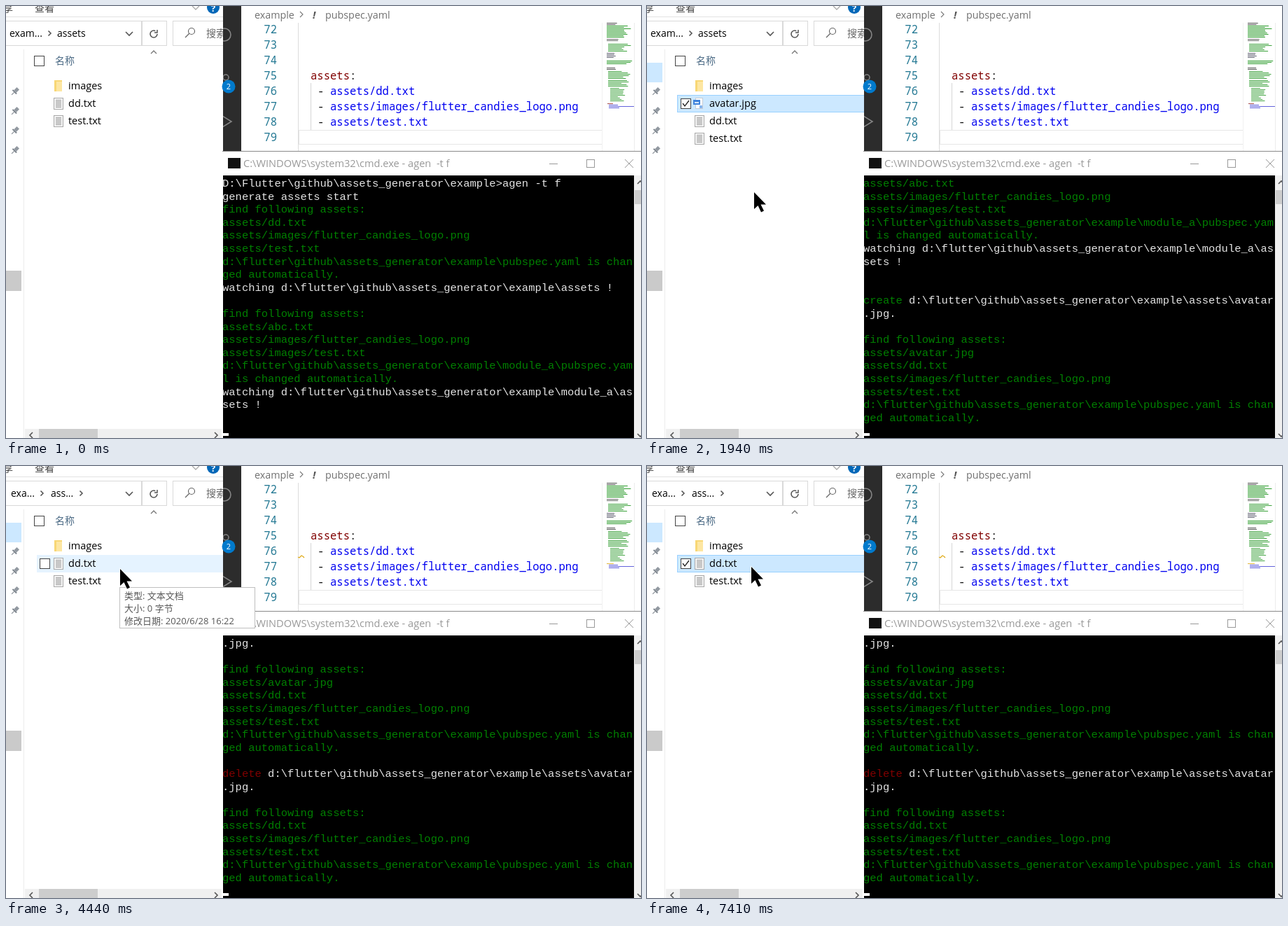
Animation, 907 px wide and 617 px high, one loop 8 s. Source, as an HTML page with a canvas:

```html
<!DOCTYPE html>
<html lang="zh">
<head>
<meta charset="utf-8">
<style>
html, body { margin: 0; width: 100%; height: 100%; overflow: hidden; background: #fff; }
canvas { display: block; }
</style>
</head>
<body>
<canvas id="stage" width="907" height="617"></canvas>
<script>
const g = document.getElementById('stage').getContext('2d');
const LOOP = 8000;
const UI = '"Open Sans", "Noto Sans CJK SC", "Noto Sans CJK", sans-serif';
const CODE = '15.55px "Noto Sans Mono", "DejaVu Sans Mono", monospace';
const TERM = '15.5px "Liberation Mono", monospace';
const ui = size => `${size}px ${UI}`;

function rect(x, y, w, h, color) { g.fillStyle = color; g.fillRect(x, y, w, h); }
function frame(x, y, w, h, color) {
  g.strokeStyle = color; g.lineWidth = 1;
  g.strokeRect(x + .5, y + .5, w - 1, h - 1);
}
function text(s, x, y, color, font = ui(14.5), align = 'left') {
  g.font = font; g.fillStyle = color; g.textAlign = align;
  g.fillText(s, x, y);
}
function line(points, color, width = 1) {
  g.strokeStyle = color; g.lineWidth = width;
  g.beginPath();
  points.forEach(([x, y]) => g.lineTo(x, y));
  g.stroke();
}
function disc(x, y, r, color) {
  g.fillStyle = color; g.beginPath(); g.arc(x, y, r, 0, 7); g.fill();
}
function ring(x, y, r, color, width = 1, from = 0, to = 7) {
  g.strokeStyle = color; g.lineWidth = width;
  g.beginPath(); g.arc(x, y, r, from, to); g.stroke();
}
// Arrow head: (dx, dy) points from the corner to the wings' middle.
function chevron(x, y, dx, dy, color, width = 1.3) {
  line([[x - dx - dy, y - dy - dx], [x, y], [x - dx + dy, y - dy + dx]], color, width);
}
const within = (t, a, b) => t >= a && t < b;

// Pointer moves: start, end, number of steps, destination.
const moves = [
  [70, 290, 4, 90, 130],
  [1070, 1300, 4, 119, 253],
  [1376, 1450, 2, 153, 266],
  [2320, 2720, 6, 165, 180],
  [2950, 3430, 7, 163, 147],
  [4600, 4680, 2, 157, 139],
  [4840, 5060, 4, 157, 122],
  [5230, 5300, 2, 151, 146],
  [6010, 6090, 2, 153, 125],
  [6240, 6480, 4, 155, 118],
  [6860, 7090, 4, 153, 130],
  [7330, 7410, 2, 149, 144]
];
function pointer(t) {
  if (t < 70 || within(t, 360, 1070)) return null;
  let x = 917, y = 661;
  for (const [start, end, steps, tx, ty] of moves) {
    if (t < start) break;
    if (start === 1070) { x = -20; y = 233; }
    const k = Math.min(1, Math.floor((t - start) / (end - start) * (steps - 1) + 1.01) / steps);
    x += (tx - x) * k;
    y += (ty - y) * k;
  }
  return { x, y };
}

const GREEN = '#008000', WHITE = '#e4e4e4', RED = '#800000';
const ROOT = 'd:\\flutter\\github\\assets_generator\\example';
const LOGO = 'assets/images/flutter_candies_logo.png';
const green = (...lines) => lines.map(s => [s, GREEN]);
const white = (...lines) => lines.map(s => [s, WHITE]);
const found = files => green('find following assets:', ...files,
  ROOT + '\\pubspec.yaml is chan', 'ged automatically.');
const event = (word, color) => [
  [word, color, ' ' + ROOT + '\\assets\\avatar'], ...white('.jpg.', '')
];
const plain = ['assets/dd.txt', LOGO, 'assets/test.txt'];
const log = [
  ...white('D:\\Flutter\\github\\assets_generator\\example>agen -t f', 'generate assets start'),
  ...found(plain),
  ...white('watching ' + ROOT + '\\assets !', ''),
  ...green('find following assets:', 'assets/abc.txt', LOGO, 'assets/images/test.txt',
    ROOT + '\\module_a\\pubspec.yam', 'l is changed automatically.'),
  ...white('watching ' + ROOT + '\\module_a\\as', 'sets !', '', ''),
  ...event('create', GREEN),
  ...found(['assets/avatar.jpg', ...plain]),
  ...white(''),
  ...event('delete', RED),
  ...found(plain)
];

function checkbox(x, y, checked) {
  rect(x, y, 15, 15, '#fff');
  frame(x, y, 15, 15, '#444');
  if (checked) line([[x + 3, y + 7], [x + 6, y + 11], [x + 12, y + 3]], '#222', 1.3);
}

function fileIcon(name, y) {
  if (name === 'images') {
    rect(69, y - 8, 11, 16, '#f8d775');
    rect(72, y - 6, 8, 14, '#fde6a2');
  } else if (name === 'avatar.jpg') {
    rect(69, y - 8, 11, 16, '#fff');
    frame(69, y - 8, 11, 16, '#c5ccd6');
    rect(66, y - 5, 10, 7, '#3f83dc');
    rect(68, y - 2, 6, 2, '#d5e7fb');
    rect(75, y + 3, 4, 4, '#86b5ee');
  } else {
    rect(68, y - 8, 14, 17, '#f4f4f4');
    frame(68, y - 8, 14, 17, '#a8a8a8');
    for (let i = -5; i < 7; i += 2) rect(71, y + i, 8, 1, '#9c9c9c');
  }
}

function fileList(t, tip) {
  const files = ['images', 'dd.txt', 'test.txt'];
  if (within(t, 1690, 3970)) files.splice(1, 0, 'avatar.jpg');
  const selected = name => name === 'avatar.jpg' ||
    (name === 'dd.txt' && t >= 6010) ||
    (name === 'images' && within(t, 6240, 7330));
  const free = tip && t >= 1690 && !within(t, 6010, 6860);
  files.forEach((name, i) => {
    const top = 102 + 25 * i, mid = top + 12;
    const hover = free && tip.y >= top && tip.y < top + 25;
    if (selected(name)) {
      rect(43, top, 270, 25, '#cce8ff');
      frame(43, top, 270, 25, '#99d1ff');
    } else if (hover) rect(44, top, 266, 25, '#e5f3ff');
    if (selected(name) || hover) checkbox(48, mid - 7, selected(name));
    fileIcon(name, mid);
    text(name, 89, mid + 5, '#000');
  });
}

function pin(y) {
  g.save();
  g.translate(13, y);
  g.rotate(Math.PI / 4);
  rect(-2.5, -6, 5, 6, '#9299a1');
  rect(-4, 0, 8, 2, '#7e868e');
  rect(-.5, 2, 1, 5, '#7e868e');
  g.restore();
}

function explorer(t, tip) {
  rect(0, 0, 310, 617, '#fff');
  text('享', -4, 8, '#444', ui(14));
  text('查看', 41, 8, '#444', ui(14));
  if (within(t, 2090, 3970)) {
    rect(86, 0, 1, 9, '#ccc');
    rect(174, 0, 1, 9, '#ccc');
    text('图片工具', 102, 8, '#444', ui(14));
  }
  chevron(271, 5, 0, 5, '#aaa');
  disc(296, 2, 9, '#0067b8');
  text('?', 296, 8, '#fff', 'bold ' + ui(13), 'center');
  rect(0, 15, 310, 1, '#e2e2e2');
  frame(-2, 21, 197, 36, '#d9d9d9');
  frame(193, 21, 37, 36, '#d9d9d9');
  frame(238, 21, 80, 36, '#d9d9d9');
  const crumbs = t < 2160
    ? [['exam...', 5, 64], ['assets', 73]]
    : [['exa...', 7, 53], ['ass...', 64, 109]];
  for (const [name, x, arrowX] of crumbs) {
    text(name, x, 44, '#000', ui(14));
    if (arrowX) chevron(arrowX, 39, 3.5, 0, '#555', 1.6);
  }
  chevron(176, 42, 0, 5, '#555', 1.6);
  ring(211, 40, 5, '#555', 1.6, 0, 5.2);
  line([[216, 34], [216, 38], [212, 38]], '#555', 1.5);
  ring(265, 36, 4.5, '#666', 1.2);
  line([[262, 39], [256, 45]], '#666', 1.2);
  text('搜索', 286, 44, '#666', ui(14));

  rect(25, 62, 1, 555, '#ececec');
  if (t >= 360) rect(0, 81, 22, 28, '#cce8ff');
  [122, 150, 178, 206].forEach(pin);
  rect(0, 378, 22, 29, '#cacaca');
  checkbox(40, 71, false);
  text('名称', 70, 83, '#4b6a85', ui(14));
  chevron(211, 64, 0, -4, '#777');
  fileList(t, tip);
  rect(27, 604, 281, 13, '#f0f0f0');
  rect(47, 604, 84, 13, '#cdcdcd');
  chevron(34, 613, -4, 0, '#555', 1.6);
  chevron(302, 613, 4, 0, '#555', 1.6);
}

// Minimap blocks: top, bottom, indent, widest line, colour.
const blocks = [
  [24, 27, 1, 17, '#555'], [28, 45, 1, 39, '#2f9d2f'], [47, 51, 1, 18, '#666'],
  [54, 65, 3, 37, '#3fa33f'], [67, 75, 1, 15, '#667'], [78, 84, 1, 39, '#2f9d2f'],
  [88, 91, 1, 18, '#555'], [93, 104, 3, 37, '#3fa33f'], [106, 115, 3, 33, '#3fa33f'],
  [117, 137, 6, 28, '#4aa84a']
];
function minimap(added, warned) {
  blocks.forEach(([top, bottom, indent, width, color]) => {
    for (let y = top; y < bottom; y += 2) {
      const r = Math.abs(Math.sin(y * 12.99) * 437.58) % 1;
      rect(857 + indent, y, width * (.6 + .4 * r) - indent, 1, color);
    }
  });
  g.globalAlpha = .7;
  rect(859, 139, 8, 1, '#800000');
  [...(added ? [17] : []), 13, 36, 15].forEach((w, i) => rect(861, 141 + 2 * i, w, 1, '#22c'));
  g.globalAlpha = 1;
  if (added) rect(853, 140, 1, 3, '#81b88b');
  if (warned) rect(858, 139, 10, 1, '#e2b53c');
}

function editor(t) {
  const added = within(t, 2480, 4060), warned = t >= 4290;
  g.save();
  g.beginPath(); g.rect(310, 0, 597, 208); g.clip();
  rect(310, 0, 26, 208, '#2c2c2c');
  ring(312, 41, 9, '#858585', 1.6);
  ring(314, 102, 4, '#858585', 1.5);
  line([[309, 157], [322, 165], [309, 173]], '#858585', 1.6);

  rect(336, 0, 571, 208, '#fff');
  text('example', 355, 18, '#707070', ui(14.3));
  chevron(424, 12, 4, 0, '#777', 1.1);
  text('!', 438, 18, '#555', 'bold italic ' + ui(15));
  text('pubspec.yaml', 456, 18, '#707070', ui(14.3));
  const base = n => 38.5 + 22.1 * (n - 72);
  const lastLine = added ? 80 : 79;
  for (let n = 72; n <= lastLine; n++) text(n, 387, base(n), '#237893', CODE, 'right');
  rect(417, 24, 1, 184, '#dcdcdc');
  const files = [...(added ? ['assets/avatar.jpg'] : []), ...plain];
  const last = added ? 199 : 177;
  rect(435, 110, 1, last - 110, '#d6d6d6');
  frame(418, last, 434, 21, '#e6e6e6');
  text('assets', 435, base(75), '#800000', CODE);
  text(':', 491, base(75), '#111', CODE);
  files.forEach((name, i) => {
    text('-', 445, base(76 + i), '#111', CODE);
    text(name, 463, base(76 + i), '#0000f0', CODE);
  });
  if (within(t, 2480, 4290)) rect(392, 110, 4, 22, '#81b88b');
  if (warned) line([[417, 130], [419, 131], [422, 128], [424, 129], [426, 131]], '#e0ac1c', 1.3);
  rect(851, 24, 1, 184, '#f0f0f0');
  minimap(added, warned);
  rect(897, 24, 1, 184, '#ececec');
  g.restore();
  disc(318, 115, 9.5, '#007acc');
  text('2', 318, 119, '#fff', ui(11), 'center');
}

function terminal(t) {
  const end = t < 1770 ? 19 : t < 1850 ? 22 : t < 3890 ? 30 : 40;
  const first = end - 19;
  rect(309, 207, 598, 1, '#8a8a8a');
  rect(310, 208, 597, 34, '#fff');
  rect(317, 217, 18, 15, '#111');
  text('C:\\WINDOWS\\system32\\cmd.exe - agen  -t f', 339, 230, '#999', ui(14.6));
  rect(776, 225, 12, 1, '#999');
  frame(829, 219, 12, 12, '#999');
  line([[884, 219], [896, 231]], '#999');
  line([[896, 219], [884, 231]], '#999');
  rect(310, 242, 587, 375, '#000');
  rect(897, 242, 10, 375, '#f0f0f0');
  rect(898, 263, 9, 20, '#cdcdcd');
  chevron(906, 250, 0, -4, '#555', 1.6);
  chevron(906, 615, 0, 4, '#555', 1.6);
  g.save();
  g.beginPath(); g.rect(309, 242, 588, 375); g.clip();
  for (let i = first; i < end; i++) {
    const [s, color, rest] = log[i], y = 258 + 18.6 * (i - first);
    text(s, 309, y, color, TERM);
    if (rest) text(rest, 309 + g.measureText(s).width, y, WHITE, TERM);
  }
  g.restore();
  rect(310, 610, 8, 4, '#fff');
}

function ghost({ x, y }) {
  g.save();
  g.translate(x, y);
  g.shadowColor = 'rgba(0,0,0,.3)'; g.shadowBlur = 4;
  rect(-55, -45, 53, 53, '#fff');
  g.shadowBlur = 0;
  g.fillStyle = '#f3e5c4';
  g.beginPath(); g.ellipse(-29, -17, 20, 16, 0, 0, 7); g.fill();
  checkbox(-57, -46, true);
  line([[-16, -44], [-10, -38]], '#2b88d8', 3);
  line([[-8, -36], [-2, -30]], '#2b88d8', 3);
  line([[-16, -36], [-10, -36], [-10, -42]], '#2b88d8', 2);
  line([[-8, -30], [-8, -37], [-2, -37]], '#2b88d8', 2);
  g.shadowColor = '#333'; g.shadowBlur = 4; g.shadowOffsetX = g.shadowOffsetY = 1;
  text('avatar.jpg', -62, 27, '#fff');
  g.restore();
}

function dropLabel({ x, y }) {
  g.save();
  g.translate(x, y);
  rect(10, 10, 118, 24, '#fff');
  frame(10, 10, 118, 24, '#7a7a7a');
  rect(16, 20, 13, 2, '#2450c8');
  rect(21.5, 15, 2, 13, '#2450c8');
  text('复制到', 34, 26, '#2a5bd7', ui(14));
  text('assets', 80, 26, '#00156b', ui(13.8));
  g.restore();
}

function tooltip({ x, y }) {
  const left = Math.round(x) - 1, top = Math.round(y) + 26;
  rect(left, top, 194, 59, '#fff');
  frame(left, top, 194, 59, '#bfbfbf');
  ['类型: 文本文档', '大小: 0 字节', '修改日期: 2020/6/28 16:22']
    .forEach((s, i) => text(s, left + 7, top + 17 + 18 * i, '#575757', ui(13)));
}

function arrow({ x, y }) {
  g.save();
  g.translate(x, y);
  g.beginPath();
  [[0, 0], [0, 24], [5.5, 19], [10, 28.5], [14, 26.5], [9.5, 17.5], [17, 17.5]]
    .forEach(p => g.lineTo(...p));
  g.closePath();
  g.strokeStyle = '#fff'; g.lineWidth = 1.5; g.stroke();
  g.fillStyle = '#000'; g.fill();
  g.restore();
}

function draw() {
  const t = performance.now() % LOOP, tip = pointer(t);
  explorer(t, tip);
  editor(t);
  terminal(t);
  if (tip) {
    const dragging = within(t, 1070, 1690);
    if (dragging) ghost(tip);
    if (within(t, 6010, 6860)) {
      const w = Math.max(2, tip.x - 150), h = Math.max(2, 146 - tip.y);
      rect(150, tip.y, w, h, 'rgba(0,120,215,.45)');
      frame(150, tip.y, w, h, '#0078d7');
    }
    if (within(t, 4440, 4840) || within(t, 7170, 7330))
      tooltip(t < 5000 ? { x: 163, y: 147 } : tip);
    if (dragging) dropLabel(tip);
    arrow(tip);
  }
  requestAnimationFrame(draw);
}
draw();
</script>
</body>
</html>
```
